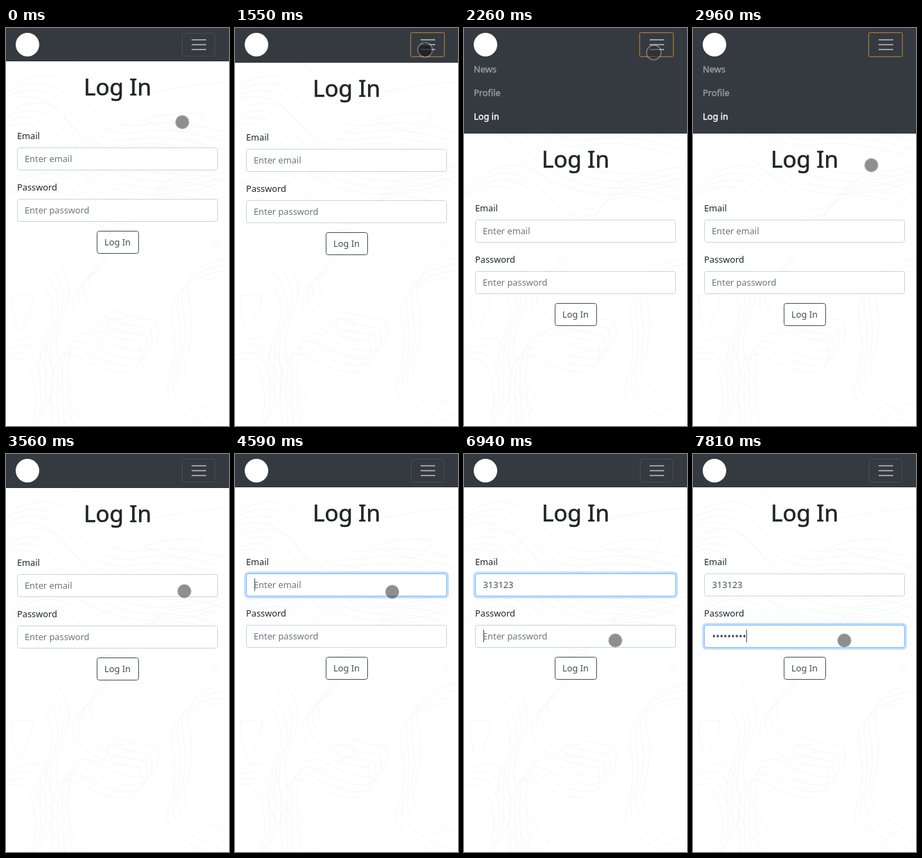
An HTML page that plays this animation: 322x573 px, repeating every 8 s.

```html
<!DOCTYPE html>
<html lang="en">
<head>
<meta charset="utf-8">
<title>Log In</title>
<style>
  * { box-sizing: border-box; }
  html, body { margin: 0; width: 100%; height: 100%; overflow: hidden; background: #fff; }
  body { position: relative; font: 12.8px/20px "Noto Sans", "Open Sans", sans-serif; color: #212529; }

  .contours { position: absolute; left: 0; top: 0; fill: none; stroke: #f7f7f7; stroke-width: 1; }

  nav { position: relative; padding: 42px 14px 6.3px; background: #343a40; }
  .logo { position: absolute; left: 14px; top: 7px; width: 34px; height: 34px; border-radius: 50%; background: #fff; }
  .toggler { position: absolute; left: 254px; top: 7px; width: 48px; height: 34px;
    border: 1px solid #484d53; border-radius: 3.5px; }
  .toggler i { position: absolute; left: 13px; width: 21px; height: 2px; background: #999c9f; }
  .toggler::after { content: ""; position: absolute; inset: -2px -2px -2px -2px; border: 1.5px solid #ad7420;
    border-radius: 2px; animation: ring 8s step-end infinite; }
  .menu { height: 0; overflow: hidden; animation: menu 8s ease infinite; }
  .menu div { height: 34px; line-height: 34px; color: #999c9f; -webkit-text-stroke: .4px; }
  .menu .active { color: #fff; }

  main { position: relative; }
  main > * { position: absolute; }
  h1 { left: 0; top: 17px; width: 322px; margin: 0; text-align: center;
    font-size: 33px; line-height: 40px; font-weight: 400; -webkit-text-stroke: .6px; }
  label { left: 16px; }
  .field { left: 16px; width: 290px; height: 33px; border: 1px solid #ced4da; border-radius: 3.5px;
    background: #fff; line-height: 31px; }
  .field::after { content: ""; position: absolute; inset: -1px; border: 1px solid #80bdff; border-radius: 3.5px;
    box-shadow: 0 0 0 2.8px rgba(0, 123, 255, .25); opacity: 0; animation: 8s ease-in-out infinite; }
  .field span { position: absolute; left: 10px; top: 0; color: #6c757d; white-space: nowrap;
    animation: 8s step-end infinite; }
  .field b { position: absolute; left: 10.5px; top: 6px; height: 18px; line-height: 19px; font-weight: 400;
    color: #495057; white-space: nowrap; overflow: hidden; box-sizing: content-box; width: 0;
    border-right: 1px solid transparent; animation: 8s step-end infinite; }
  .password b { font-size: 14.6px; }
  .email::after { animation-name: email-focus; }
  .email span { animation-name: email-hint; }
  .email b { animation-name: email-typing, email-caret; }
  .password::after { animation-name: password-focus; }
  .password span { animation-name: password-hint; }
  .password b { animation-name: password-typing, password-caret; }
  .submit { left: 130.5px; top: 244px; width: 61px; height: 33px; line-height: 31px; text-align: center;
    border: 1px solid #4b5056; border-radius: 3.5px; background: #fff; color: #43494f; }

  .touch { position: absolute; left: -11px; top: -11px; width: 22px; height: 22px; border-radius: 50%;
    border: 1.3px solid rgba(255, 255, 255, .5); background: rgba(45, 45, 45, .53) padding-box;
    animation: move 8s ease-in-out infinite, press 8s step-end infinite; }

  @keyframes move {
    0%, 5.9% { transform: translate(254.5px, 135.5px); }
    14.6%, 27.2% { transform: translate(274.5px, 31.5px); }
    37%, 45.2% { transform: translate(257.5px, 197.5px); }
    50.5%, 76.7% { transform: translate(227px, 198.5px); }
    80.9%, 100% { transform: translate(218.5px, 268.5px); }
  }
  @keyframes press {
    0%, 20.3%, 40.7%, 55.3%, 86.7%, 100% { background-color: rgba(45, 45, 45, .53); }
    17.5%, 38.8%, 53.3%, 84.7% { background-color: rgba(25, 27, 29, .72); }
  }
  @keyframes ring {
    0%, 40.6%, 100% { opacity: 0; }
    19.2% { opacity: 1; }
  }
  @keyframes menu {
    0%, 19.25% { height: 0; }
    23.65%, 40.7% { height: 103.3px; }
    45.1%, 100% { height: 0; }
  }
  @keyframes email-focus {
    0%, 55% { opacity: 0; }
    56.9%, 86.5% { opacity: 1; }
    88.4%, 100% { opacity: 0; }
  }
  @keyframes password-focus {
    0%, 86.5% { opacity: 0; }
    88.4%, 100% { opacity: 1; }
  }
  @keyframes email-hint { 0% { opacity: 1; } 67.1%, 100% { opacity: 0; } }
  @keyframes password-hint { 0% { opacity: 1; } 90.7%, 100% { opacity: 0; } }
  @keyframes email-typing {
    0% { width: 0; }
    67.1% { width: 1ch; }
    69% { width: 2ch; }
    70% { width: 3ch; }
    71% { width: 4ch; }
    72%, 100% { width: 6ch; }
  }
  @keyframes password-typing {
    0% { width: 0; }
    90.7% { width: .38em; }
    92.7% { width: 1.14em; }
    93.7% { width: 1.52em; }
    94.6% { width: 2.28em; }
    95.6% { width: 3.04em; }
    97.6%, 100% { width: 3.42em; }
  }
  @keyframes email-caret {
    0%, 62.2%, 78.5%, 86.7%, 100% { border-color: transparent; }
    55.3%, 67.1%, 84.7% { border-color: #495057; }
  }
  @keyframes password-caret {
    0% { border-color: transparent; }
    86.7%, 100% { border-color: #495057; }
  }
</style>
</head>
<body>
<svg class="contours" width="322" height="573">
  <g id="slopes">
    <path d="M0 92Q60 60 100 110T190 150T322 165"/>
    <path d="M0 130Q50 100 85 150T180 215T322 205"/>
    <path d="M0 235Q70 180 120 240T205 250T322 240"/>
    <path d="M150 330Q95 365 118 395T208 432Q218 465 195 474T120 455T85 573"/>
    <path d="M322 340Q245 350 255 400T250 490T322 560"/>
    <path d="M0 465Q45 440 55 490T40 573"/>
    <path d="M60 340Q95 375 75 420T70 500T115 573"/>
  </g>
  <use href="#slopes" x="-7" y="10"/>
  <use href="#slopes" x="-15" y="19"/>
  <use href="#slopes" x="9" y="-11"/>
  <path d="M198 133Q240 118 284 124Q282 142 255 150Q228 142 198 133Z"/>
  <path d="M8 385L38 383Q40 402 30 414Q24 438 18 436Q8 420 8 385Z"/>
  <path d="M145 420L168 418Q180 430 165 438L148 436Z"/>
  <path d="M95 48Q150 105 215 92T322 78"/>
  <circle cx="303" cy="309" r="4"/>
</svg>
<nav>
  <div class="logo"></div>
  <div class="toggler"><i style="top:8px"></i><i style="top:15px"></i><i style="top:22px"></i></div>
  <div class="menu"><div>News</div><div>Profile</div><div class="active">Log in</div></div>
</nav>
<main>
  <h1>Log In</h1>
  <label style="top:97px">Email</label>
  <div class="field email" style="top:124px"><span>Enter email</span><b>313123</b></div>
  <label style="top:171px">Password</label>
  <div class="field password" style="top:198px"><span>Enter password</span><b>•••••••••</b></div>
  <div class="submit">Log In</div>
</main>
<div class="touch"></div>
</body>
</html>
```
